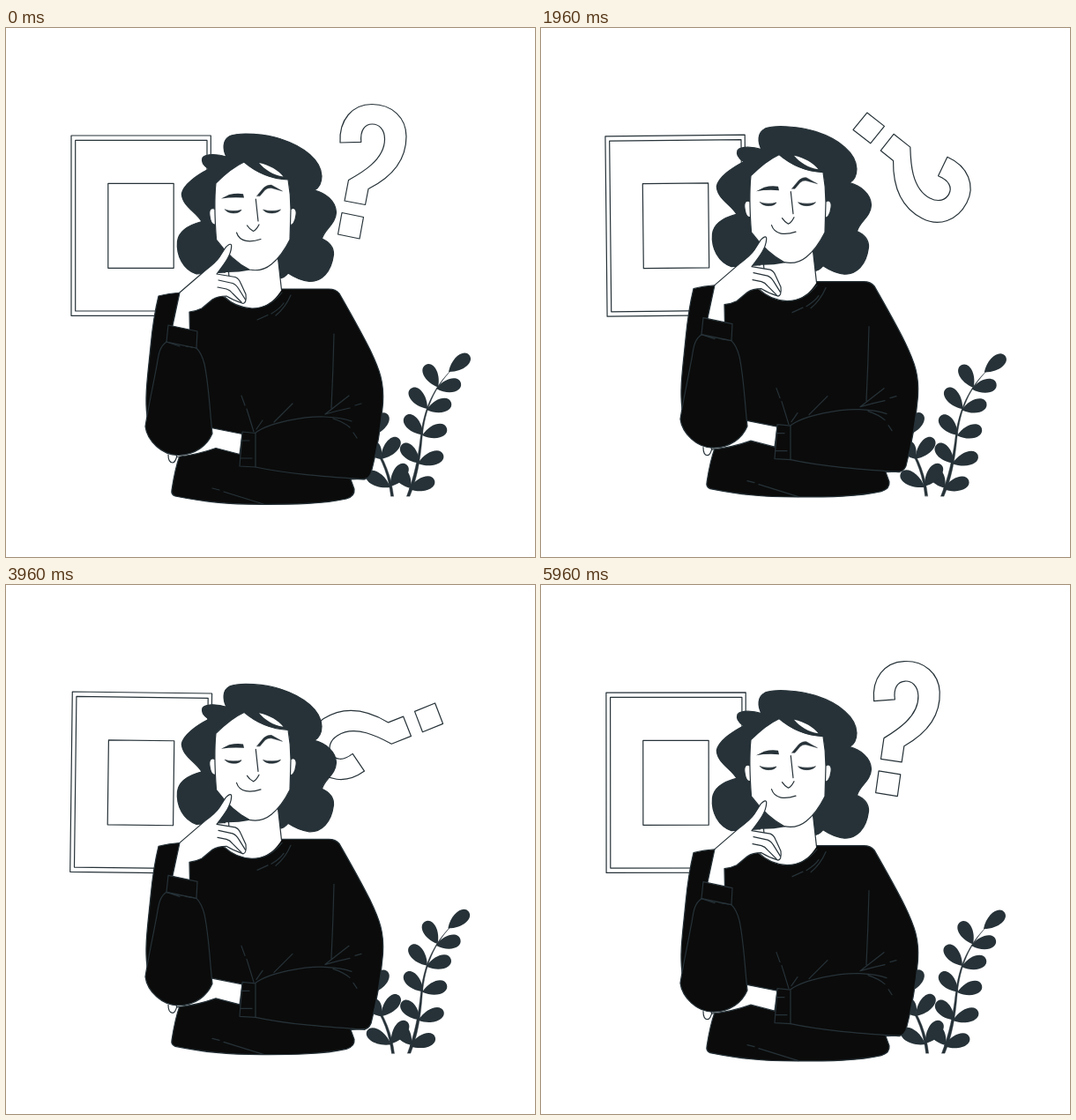
An HTML page with a canvas that plays this animation: 600x600 px, repeating every 6000 ms.

```html
<!DOCTYPE html>
<html lang="en">
<head>
<meta charset="utf-8">
<title>Thinking</title>
<style>
html, body { margin: 0; width: 100%; height: 100%; overflow: hidden; background: #fff; }
canvas { display: block; width: 600px; height: 600px; }
</style>
</head>
<body>
<canvas id="stage"></canvas>
<script>
const INK = '#263238', BLACK = '#0b0b0b', WHITE = '#fff';
const LOOP = 6000, FPS = 24;
const canvas = document.getElementById('stage');
const ctx = canvas.getContext('2d');
const ratio = window.devicePixelRatio || 1;
canvas.width = canvas.height = 600 * ratio;

function shape(d, fill, stroke = INK, width = 1.2) {
  const p = new Path2D(d);
  if (fill) { ctx.fillStyle = fill; ctx.fill(p); }
  if (stroke) { ctx.strokeStyle = stroke; ctx.lineWidth = width; ctx.stroke(p); }
}
const line = (d, width) => shape(d, null, INK, width);

function turned(x, y, degrees, draw) {
  ctx.save();
  ctx.translate(x, y);
  ctx.rotate(degrees * Math.PI / 180);
  ctx.translate(-x, -y);
  draw();
  ctx.restore();
}

// 0 -> 1 at a quarter, -1 at three quarters, back to 0
function sway(p) {
  if (p < 0.25) return p * 4;
  return p < 0.75 ? 2 - p * 4 : p * 4 - 4;
}

function picture() {
  line('M74 122H232.3V326.3H74Z M78.7 127.4H228V321H78.7Z M115.8 176.3H190.2V272.3H115.8Z');
}

function question() {
  line('M379 130C377.5 104 393 86.5 415 86.5C438 86.5 454 102 454 123C454 152 436 170 411 182.5' +
    'L407.5 200.5L384 196L388.5 172.5C402 165 429.5 150 429.5 126C429.5 115 423 109 415.5 109' +
    'C407 109 401.5 116 402.8 129.3Z M381 209.5L405.5 214.5L401 239L376.5 234Z');
}

// Teardrop from its stalk (x, y) to its round end
function leaf(x, y, ex, ey) {
  const len = Math.hypot(ex - x, ey - y), w = 12.5;
  ctx.save();
  ctx.translate(x, y);
  ctx.rotate(Math.atan2(ey - y, ex - x));
  ctx.beginPath();
  ctx.moveTo(0, 0);
  ctx.bezierCurveTo(len * 0.45, -w * 0.9, len, -w * 0.75, len, 0);
  ctx.bezierCurveTo(len, w * 0.75, len * 0.45, w * 0.9, 0, 0);
  ctx.fillStyle = INK;
  ctx.fill();
  ctx.restore();
}

function plants() {
  shape('M454.5 531C463 509 467.5 487 470 465C474 431 485 408 505 388C486 408.5 475.5 431 472 465' +
    'C470 490 466 512 458 531Z', INK, INK, 0.4);
  shape('M436.5 531C434 509 428 492 414 470L415.5 469C430 490 437 509 439.6 531Z', INK, INK, 0.4);
  [
    [502, 390, 525.5, 371], [490, 407.5, 476, 382], [488, 409, 516, 403],
    [478, 432, 459, 409], [477, 433, 505, 425],
    [473, 461.5, 453, 440], [472, 462, 500, 454],
    [469, 493.5, 449, 472.5], [467, 494, 496, 484],
    [459, 522, 444, 500], [457, 523, 486, 513],
    [436, 520, 454, 495], [436, 521, 409, 505],
    [425, 489, 445.5, 465.5], [425, 489, 413, 470], [414, 463, 432, 437.5]
  ].forEach(l => leaf(...l));
}

function hair() {
  shape('M250 146C246 138 245 127 254 122.5C265 118 295 120 312 126C338 134.5 357.5 150 358 168' +
    'C358 175 355 181 350 184C362 187 374 196 374.5 209C374 223 361 228 358.5 239' +
    'C365 242 372 248 371.5 257C369 277 358 288 344 287.5C333 286 326 282 320 278' +
    'Q315 284 309 284L250 277L216 279C201 274 193 258 194.5 242C196 229 209 223 222 219.5' +
    'C215 208 200 202 199.3 188C201 178 216 167 230 160C224 156 221 152 223 147C227 142 241 143 250 146Z', INK);
}

function torso() {
  shape('M173 304Q184 301 200 300L240 298L313 296H366Q374 296 378 301C390 322 402 343 413 365' +
    'C424 388 429 402 427.5 426C425 456 420 482 414 505Q411 512 405 511.5L391 512' +
    'L395 523Q396 531 386 534C360 540 325 540.3 290 540.3C250 540.3 225 537.5 192 531Q187 529 188 524' +
    'C190 511 193 496 197 485L160 440C157 418 161 392 164 361C166 340 169 320 173 304Z', BLACK);
}

function foldLines() {
  line('M285 331L297 325.5M301 324Q311 318 315 312M306 326Q317 317 323 303' +
    'M267 417L271 428M273 432L281 458M284 455L291 445M304 447L325 426' +
    'M372 347Q371 390 369 431M362 438L389 417M362 438Q376 434 390 431M396 428L403 426' +
    'M371 443Q383 447 390 453M394 459L398 465' +
    'M283 459C299 447 340 440 362 441Q382 442 392 446M283 498C320 506 365 509 407 512' +
    'M234 522L242 524M247 526L292 540');
}

function head() {
  shape('M250 270L300 248L308.5 261L312.5 297C302 314 289 318 279 318C264 317 254 311 246 304Z', WHITE, null);
  line('M308.5 261L312.5 297M313 300C302 314 289 318 279 318C264 317 254 311 248 305M252.5 276L253 283');
  shape('M239 277L252 252L277 274.5Q264 277 252 277Z', INK, null);
  shape('M238 206C232 202 230 207 231 213C232 221 235 225 239 222Z', WHITE);
  shape('M322 206C327 202 330 206 329 212C328 220 325 225 321 223Z', WHITE);
  shape('M238 176C247 167 259 157 270 152C283 163 298 171 320 172C322 183 323 194 323 206L322 240' +
    'C317 250 311 260 301 268Q290 277 276 274C262 267 249 254 238.5 240C237 219 236 195 238 176Z', WHITE);
  shape('M287 153C299 155.5 309 161.5 314.5 168.5C303 167 293.5 160.5 287 153Z', WHITE, null);
  shape('M244 193.5L253 189Q262 186.8 269 188.2L270 192.5Q256 191.5 244 193.5Z', INK, null);
  shape('M284.5 190.5L292 181.5Q296 177.5 301 178L313.5 185L301 181.5Q297 181 294 183.5L288 190.5Z', INK, INK, 0.4);
  shape('M248.5 206C254 208 262 208 267 206.3C265 211 252 211.5 248.5 206Z', INK, INK, 0.6);
  shape('M292 206.3C298 208 306 208 311.5 206C308 211 295 211.5 292 206.3Z', INK, INK, 0.6);
  line('M283.3 194L286 219M287 223Q284 229 280.5 230.5Q276 228 273.5 224');
  line('M261.5 232C265 243 277 243.5 289 239.5');
}

function raisedHand() {
  shape('M188 342L197 300L226 275Q238 266 242 260L249 249Q256 242 255.7 248' +
    'C255 258 249 266 239 279L260 282.5Q264 284 266 289L272 302Q273 312 269 312.5' +
    'Q258 309 250 304Q240 304 234 308L222 318Q216 321 208 322L208.5 346Z', WHITE);
  line('M241 286L257 289.5Q261 291 264 296L271.5 308M240 294L250 296Q254 297 257 301L267 311');
}

function foldedHand() {
  shape('M184 484Q184 493 189 493Q192 493 194 485', WHITE);
  shape('M230 453L268 460.5L265 483.5L238 476.5Q217 484 194 486.5L190 478Z', WHITE);
  shape('M268 458L283 459.5L283 498L265 497Z', BLACK);
  line('M268 468H276M266 488H279');
}

function raisedSleeve() {
  shape('M182 356C172 363 173 375 170 388C166 410 161 432 158 452C160 468 177 485 196 484.5' +
    'C215 484 228 474 234 460C231 432 230 404 225 381Q222 369 216 363Z', BLACK);
  shape('M184 337L217 344L216 363L182 356Z', BLACK);
  line('M182 356L197 361M204 361L211 362');
}

function person() {
  hair();
  torso();
  foldLines();
  head();
  raisedHand();
  foldedHand();
  raisedSleeve();
}

function render(time) {
  const step = Math.floor((time % LOOP + 5) * FPS / 1000) % (LOOP * FPS / 1000);
  const whole = step * 1000 / FPS / LOOP;
  const half = whole * 2 % 1;
  ctx.setTransform(ratio, 0, 0, ratio, 0, 0);
  ctx.fillStyle = WHITE;
  ctx.fillRect(0, 0, 600, 600);
  ctx.lineCap = ctx.lineJoin = 'round';
  turned(153, 224, sway(half), picture);
  turned(455, 450, sway(whole), plants);
  turned(415, 163, whole * 360, question);
  ctx.translate(0, -12 * (1 - Math.abs(1 - half * 2)));
  person();
}

const start = performance.now();
function tick() {
  render(performance.now() - start);
  requestAnimationFrame(tick);
}
tick();
</script>
</body>
</html>
```
